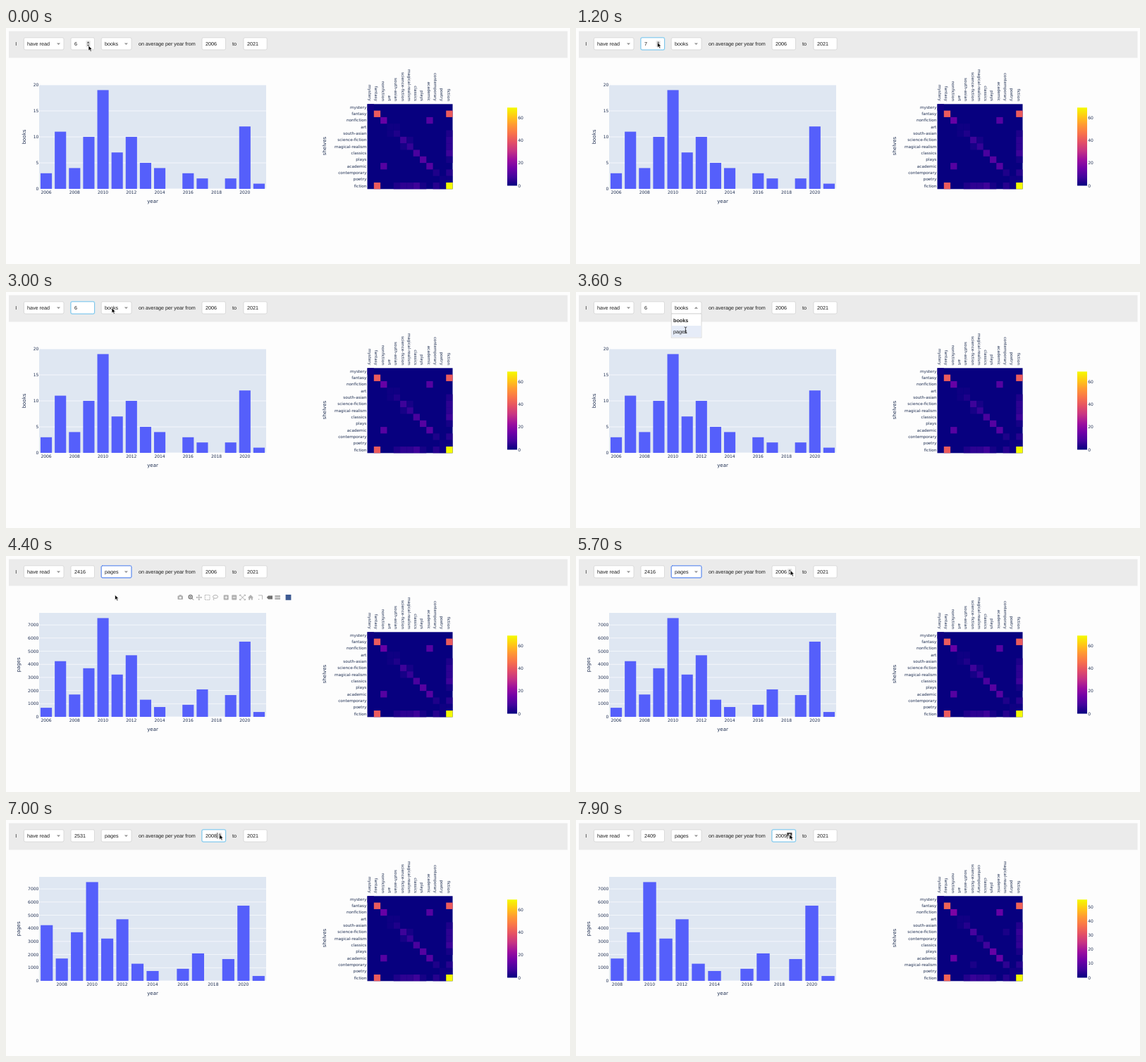
An HTML page for the animation above (8 s loop, 800x336 px).

```html
<!DOCTYPE html>
<html lang="en">
<head>
<meta charset="utf-8">
<title>Reading statistics</title>
<style>
html, body { margin: 0; width: 100%; height: 100%; overflow: hidden; background: #fdfdfd; }
svg { display: block; width: 800px; height: 336px; text-rendering: geometricPrecision; }
.ui { font: 7.2px "Liberation Sans", Arial, sans-serif; fill: #1a1a1a; }
.bold { font-weight: bold; }
.plot { font-family: "DejaVu Sans", Verdana, sans-serif; fill: #1f2f52; }
.tick { font-size: 6px; }
.shelf { font-size: 5.7px; }
.title { font-size: 7px; }
.end { text-anchor: end; }
.mid { text-anchor: middle; }
</style>
</head>
<body>
<svg viewBox="0 0 800 336">
  <defs><linearGradient id="scale" x1="0" y1="1" x2="0" y2="0"></linearGradient></defs>
  <rect width="800" height="336" fill="#fdfdfd"/>
  <rect x="4" y="4.5" width="792.5" height="38" fill="#ebebeb"/>
  <g id="bars"></g>
  <g id="heat"></g>
  <g id="modebar"></g>
  <g id="controls"></g>
  <g id="cursor"></g>
</svg>
<script>
const LOOP = 8000;

// Moments of the recorded session, in ms
const PRESSES = [600, 2300, 5900, 6700, 7800];
const RESETS = [1300, 2900];
const OPEN = 3250, PICK = 3750, REPLOT = 4100, PLOT_2007 = 6100, PLOT_2008 = 7100;

// time, x, y of the pointer tip
const PATH = [
  [0, 117, 25], [400, 117, 24], [600, 115.6, 20.6], [2600, 115.6, 20.6],
  [3100, 154, 23], [3350, 155, 24], [3550, 155.5, 54], [3750, 155, 55.4], [4500, 154.6, 55.4],
  [5300, 304, 22], [5600, 305, 20.6], [5850, 302.8, 20.6], [8000, 303, 20.6]
];

const BOOKS = [3, 11, 4, 10, 19, 7, 10, 5, 4, 0, 3, 2, 0, 2, 12, 1];
const PAGES = [691, 4239, 1700, 3700, 7520, 3220, 4690, 1305, 750, 0, 920, 2090, 0, 1660, 5726, 370];
const PLOT = { x: 47, y: 81, w: 322, h: 148 };

const SHELVES = ['mystery', 'fantasy', 'nonfiction', 'art', 'south-asian', 'science-fiction',
  'magical-realism', 'classics', 'plays', 'academic', 'contemporary', 'poetry', 'fiction'];
const COLORS = ['#07007f', '#42039c', '#6f00a7', '#9c0f9e', '#c53285',
  '#e34f66', '#f8724b', '#ff9833', '#ffc915', '#f4fb00'];
// shelf a, shelf b, shared books
const PAIRS = [[0, 0, 1], [2, 2, 14], [2, 9, 11], [9, 9, 11], [8, 8, 11], [5, 5, 7], [6, 6, 6],
  [7, 7, 9], [4, 4, 3], [3, 3, 1], [3, 4, 1], [5, 6, 2], [10, 10, 3], [11, 11, 1], [4, 12, 3],
  [5, 12, 5], [6, 12, 5], [7, 12, 7], [8, 12, 2], [10, 12, 4], [11, 12, 1]];

const $ = id => document.getElementById(id);
const last = {};
function put(id, html) {
  if (last[id] !== html) $(id).innerHTML = last[id] = html;
}

const rect = (x, y, w, h, fill, more = '') =>
  `<rect x="${x}" y="${y}" width="${w}" height="${h}" fill="${fill}" ${more}/>`;
const text = (x, y, s, cls, more = '') => `<text x="${x}" y="${y}" class="${cls}" ${more}>${s}</text>`;
const path = (d, fill, stroke = 'none', w = 1) =>
  `<path d="${d}" fill="${fill}" stroke="${stroke}" stroke-width="${w}"/>`;
const turned = (x, y, s, cls, deg) => text(0, 0, s, cls, `transform="translate(${x} ${y}) rotate(${deg})"`);

function mix(v) {
  const p = Math.max(0, Math.min(1, v)) * (COLORS.length - 1);
  const i = Math.min(Math.floor(p), COLORS.length - 2);
  const part = (c, k) => parseInt(c.slice(1 + 2 * k, 3 + 2 * k), 16);
  const rgb = [0, 1, 2].map(k => {
    const a = part(COLORS[i], k), b = part(COLORS[i + 1], k);
    return Math.round(a + (b - a) * (p - i));
  });
  return `rgb(${rgb})`;
}

function barChart(unit, from) {
  const data = (unit === 'books' ? BOOKS : PAGES).slice(from - 2006);
  const top = Math.max(...data) / 0.95;
  const step = unit === 'books' ? 5 : 1000;
  const pitch = PLOT.w / data.length;
  const base = PLOT.y + PLOT.h;
  let out = rect(PLOT.x, PLOT.y, PLOT.w, PLOT.h, '#dfe7f2');
  for (let v = 0; v <= top + 0.01; v += step) {
    const y = base - v / top * PLOT.h;
    out += rect(PLOT.x, y - 0.35, PLOT.w, 0.7, '#fbfcfe') + text(46.4, y + 2.1, v, 'plot tick end');
  }
  data.forEach((v, i) => {
    const mid = PLOT.x + (i + 0.5) * pitch, h = v / top * PLOT.h;
    out += rect(mid - pitch * 0.4, base - h, pitch * 0.8, h, '#555ffb');
    if ((from + i) % 2 === 0) out += text(mid, 235.7, from + i, 'plot tick mid');
  });
  return out + text(208, 248.6, 'year', 'plot title mid') +
    turned(unit === 'books' ? 27.6 : 20.4, 155, unit, 'plot title mid', -90);
}

function heatmap(late) {
  const x0 = 512.5, y0 = 108.3, cell = 9.31, max = late ? 55 : 69;
  const order = SHELVES.map((_, i) => i);
  if (late) [order[6], order[10]] = [10, 6];
  const place = i => order.indexOf(i);
  const big = late ? 34 : 41;
  let out = rect(x0, y0, cell * 13, cell * 13, mix(0));
  [...PAIRS, [1, 1, big], [1, 12, big], [12, 12, max]].forEach(([a, b, n]) => {
    const v = late && (a === 7 || b === 7 || a === 6) ? n * 0.65 : n;
    const spots = a === b ? [[a, b]] : [[a, b], [b, a]];
    spots.forEach(([r, c]) => {
      out += rect(x0 + place(c) * cell, y0 + place(r) * cell, cell, cell, mix(v / max));
    });
  });
  order.forEach((s, i) => {
    const mid = (i + 0.5) * cell;
    out += text(511.3, y0 + mid + 1.9, SHELVES[s], 'plot shelf end') +
      turned(x0 + mid - 3.2, 104, SHELVES[s], 'plot shelf end', 90);
  });
  out += turned(454.4, 168, 'shelves', 'plot title mid', -90);
  out += rect(711, 113.3, 14, 111.2, 'url(#scale)');
  for (let v = 0; v <= max; v += late ? 10 : 20) {
    out += text(726.2, 226.6 - v / max * 111.2, v, 'plot tick');
  }
  return out;
}

function modebar() {
  const g = '#b0b0b0', d = '#707070';
  const line = (s, c = g) => path(s, 'none', c, 1);
  const sign = s => rect(s - 3.5, 55.5, 7, 7, g, 'rx="1"') + rect(s - 2, 58.5, 4, 1, '#fff');
  return rect(243.5, 56.5, 7.5, 5.5, g, 'rx="1"') + rect(245.5, 55.4, 3.5, 2, g) +
    '<circle cx="247.2" cy="59.3" r="1.5" fill="#fff"/>' +
    '<circle cx="261.7" cy="58.3" r="2.6" fill="none" stroke="#707070" stroke-width="1.2"/>' +
    line('M263.6 60.2L266 62.6M260.5 58.3h2.4M261.7 57.1v2.4', d) +
    line('M270 59h7.6M273.8 55.2v7.6') +
    path('M269.5 59l1.8-1.6v3.2zM278.1 59l-1.8-1.6v3.2zM273.8 54.7l-1.6 1.8h3.2zM273.8 63.3l-1.6-1.8h3.2z', g) +
    rect(282.2, 55.6, 6.8, 6.8, 'none', 'stroke="#b0b0b0" stroke-dasharray="1.5 .8"') +
    '<ellipse cx="297" cy="58" rx="3.5" ry="2.3" fill="none" stroke="#b0b0b0"/>' +
    line('M295 60q-1.5 1.5 0 3') +
    sign(312.2) + rect(311.7, 57, 1, 4, '#fff') + sign(323.7) +
    line('M332 55.5l7 7M339 55.5l-7 7M331.6 57v-1.7h1.8M337.6 55.3h1.8V57M331.6 61v1.7h1.8M337.6 62.7h1.8V61') +
    path('M343 59.3l4-4 4 4h-1.2v3.2h-2v-2.2h-1.6v2.2h-2v-3.2z', g) +
    path('M358 56h5.5v5.8', 'none', g, 0.9) + rect(358, 61, 1.2, 1.2, g) +
    path('M369.8 59l2.2-2.4h6v4.8h-6z', d) +
    rect(381.4, 56, 7.6, 2.6, g) + rect(381.4, 59.4, 7.6, 2.6, g) +
    rect(396.6, 55, 7.8, 7.8, '#3d5a92');
}

function box(x, w, focus) {
  const border = stroke => `rx="2" stroke="${stroke}" stroke-width=".7"`;
  if (focus === 'input') {
    return rect(x - 0.4, 13.4, w + 0.8, 18, 'none', 'rx="2.4" stroke="#bfe3f5" stroke-width="1.2"') +
      rect(x, 13.8, w, 17.2, '#fff', border('#55b4e2'));
  }
  if (focus === 'select') {
    return rect(x, 13.8, w, 17.2, '#fff', 'rx="2" stroke="#9dbcf8" stroke-width="1.3"') +
      rect(x, 13.8, w, 17.2, 'none', 'rx="2" stroke="#2f62e0" stroke-width="1" stroke-dasharray="1 1"');
  }
  return rect(x, 13.8, w, 17.2, '#fff', border('#cfcfcf'));
}

const triangle = (x, up) => up
  ? path(`M${x - 2.6} 23.8h5.2l-2.6-2.7z`, '#909090')
  : path(`M${x - 2.6} 21.4h5.2l-2.6 2.7z`, '#909090');

function spinner(x, pressed) {
  const up = `M${x + 1.3} 21.7h3.8l-1.9-2.4z`, down = `M${x + 1.3} 23.7h3.8l-1.9 2.4z`;
  return rect(x, 18, 6.4, 9, '#e6e6e6', 'rx="1"') +
    (pressed ? rect(x, 18, 6.4, 4.5, '#444') : '') +
    path(up, pressed ? '#fff' : '#555') + path(down, '#555');
}

function controls(s) {
  const { t, count, unit, from, open, focus, caret, pressed, hover, y } = s;
  const tail = (x, value) => caret ? rect(x + String(value).length * 4 + 0.3, 18, 0.6, 8.6, '#111') : '';
  let out = text(13.3, 24.6, 'I', 'ui') +
    box(25.4, 56.6) + text(30, 24.6, 'have read', 'ui') + triangle(74.5) +
    box(92, 33.5, focus === 'count' && 'input') + text(97, 24.8, count, 'ui') +
    box(135.2, 42.8, focus === 'unit' && 'select') + text(140, 24.6, unit, 'ui') + triangle(170.4, open) +
    text(188, 24.6, 'on average per year from', 'ui') +
    box(278, 33.5, focus === 'from' && 'input') + text(283, 24.8, from, 'ui') +
    text(321, 24.6, 'to', 'ui') +
    box(337, 33.2) + text(342, 24.8, 2021, 'ui');
  if (focus === 'count') out += tail(97, count);
  if (focus === 'from') out += tail(283, from);
  if (hover === 'count') out += spinner(113.4, pressed);
  if (hover === 'from') out += spinner(300, pressed);
  if (open) {
    const low = y > 47.5;
    out += rect(135.2, 31, 42.8, 34, '#fff', 'stroke="#c8c8c8" stroke-width=".7"') +
      rect(135.6, low ? 48 : 31.6, 42, 16.4, '#e6ecf8') +
      text(138, 42.6, 'books', 'ui bold') + text(138, 59, 'pages', 'ui');
  }
  return out;
}

function pointer(x, y, beam) {
  const shape = beam
    ? path('M-1.8 -4.3q1.8 0 1.8 1.2v6.2q0 1.2 -1.8 1.2M1.8 -4.3q-1.8 0 -1.8 1.2M0 3.1q0 1.2 1.8 1.2M-1 .8h2',
      'none', '#222', 0.8)
    : path('M0 0V7.2L1.7 5.7L2.9 8.4L4.2 7.8L3 5.2H5.2Z', '#000', '#fff', 0.6);
  return `<g transform="translate(${x.toFixed(2)} ${y.toFixed(2)})">${shape}</g>`;
}

function whereAt(t) {
  const i = Math.max(1, PATH.findIndex(p => p[0] > t));
  const [t0, x0, y0] = PATH[i - 1], [t1, x1, y1] = PATH[i];
  const k = (t - t0) / (t1 - t0), e = k * k * (3 - 2 * k);
  return [x0 + (x1 - x0) * e, y0 + (y1 - y0) * e];
}

function stateAt(t) {
  const [x, y] = whereAt(t);
  const press = PRESSES.filter(p => p <= t).pop();
  const unit = t < PICK ? 'books' : 'pages';
  const plotFrom = t < PLOT_2007 ? 2006 : t < PLOT_2008 ? 2007 : 2008;
  const bumped = (t >= PRESSES[0] && t < RESETS[0]) || (t >= PRESSES[1] && t < RESETS[1]);
  const averages = { 2006: 2416, 2007: 2531, 2008: 2409 };
  const inside = x0 => x >= x0 && x <= x0 + 33.5 && y > 14 && y < 31;
  return {
    t, x, y, unit, plotFrom,
    plotUnit: t < REPLOT ? 'books' : 'pages',
    count: t < REPLOT ? (bumped ? 7 : 6) : averages[plotFrom],
    from: 2006 + PRESSES.slice(2).filter(p => p <= t).length,
    open: t >= OPEN && t < PICK,
    focus: t < PRESSES[0] || (t >= OPEN && t < PICK) ? '' :
      t < OPEN ? 'count' : t < PRESSES[2] ? 'unit' : 'from',
    caret: press !== undefined && (t - press) % 1000 < 500,
    pressed: press !== undefined && t - press < 200,
    hover: inside(92) ? 'count' : inside(278) ? 'from' : ''
  };
}

function render(t) {
  const s = stateAt(t);
  put('bars', barChart(s.plotUnit, s.plotFrom));
  put('heat', heatmap(s.plotFrom === 2008));
  put('modebar', t >= PICK && s.y > 47 ? modebar() : '');
  put('controls', controls(s));
  put('cursor', pointer(s.x, s.y, s.open && s.y > 34));
}

$('scale').innerHTML = COLORS.map((c, i) =>
  `<stop offset="${i / (COLORS.length - 1)}" stop-color="${c}"/>`).join('');

const start = performance.now();
function loop() {
  render((performance.now() - start) % LOOP);
  requestAnimationFrame(loop);
}
loop();
</script>
</body>
</html>
```
